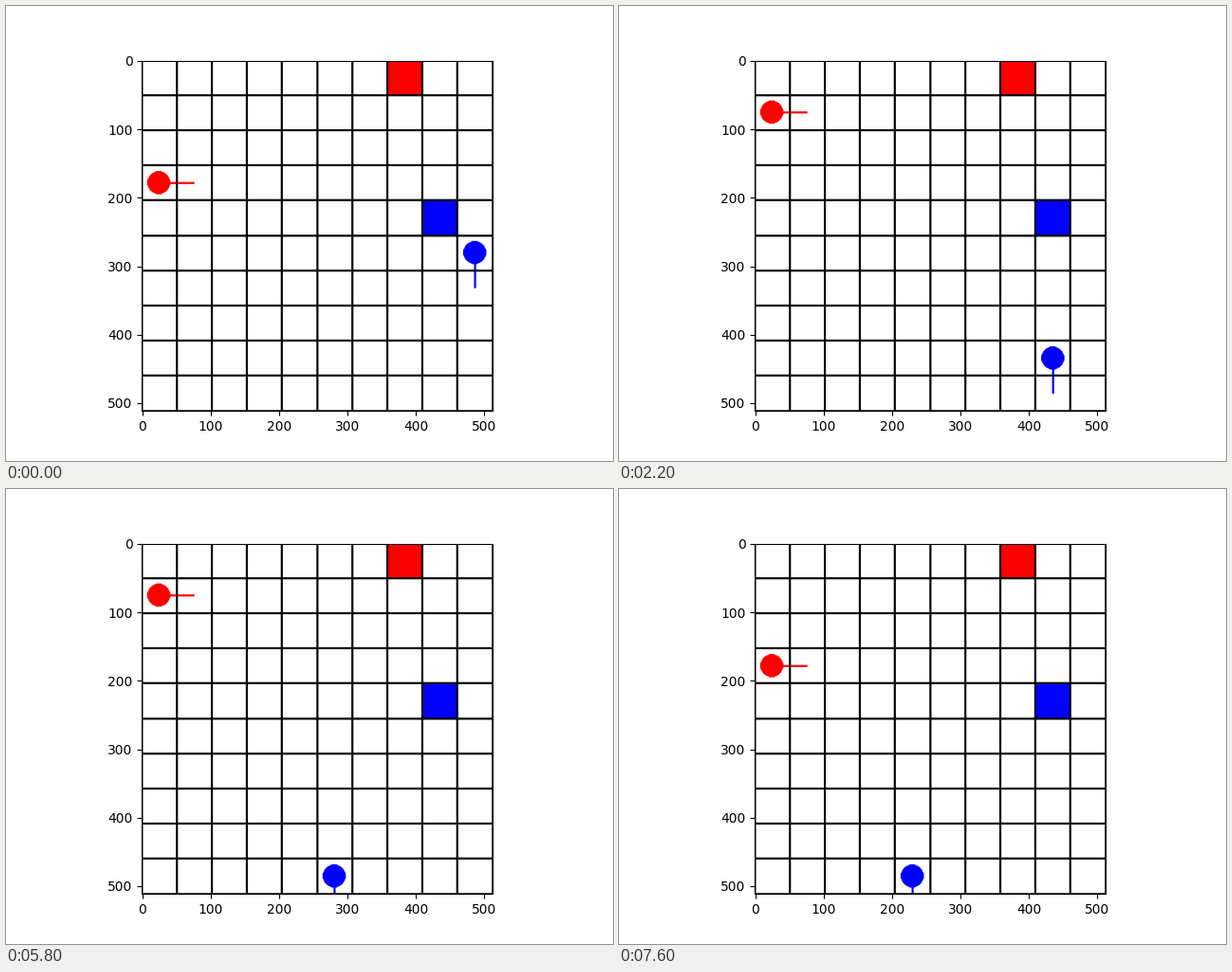
Write a matplotlib script that moves like this. It is 640 by 480 pixels and loops after 8000 ms.

```python
import numpy as np
import matplotlib.pyplot as plt
from matplotlib.animation import FuncAnimation

SIZE, CELLS = 512, 10
STEP_MS, LOOP_MS = 200, 8000
RADIUS = SIZE // (3 * CELLS)
RED, BLUE, BLACK = (255, 0, 0), (0, 0, 255), (0, 0, 0)
MOVES = {"L": (-1, 0), "R": (1, 0), "U": (0, -1), "D": (0, 1), ".": (0, 0)}

rows, cols = np.mgrid[:SIZE, :SIZE]


def px(cell):
    """Canvas coordinate of a position given in cells."""
    return int(SIZE * cell / CELLS)


def fill(img, x0, y0, x1, y1, color):
    img[max(y0, 0):y1 + 1, max(x0, 0):x1 + 1] = color


class Agent:
    """Walks one cell per beat, starting at first_ms."""

    def __init__(self, color, start, heading, first_ms, beat_ms, path):
        self.color, self.start, self.heading = color, start, heading
        self.first_ms, self.beat_ms, self.path = first_ms, beat_ms, path

    def cell(self, ms):
        beats = max(0, (ms - self.first_ms) // self.beat_ms + 1)
        return np.sum([self.start] + [MOVES[m] for m in self.path[:beats]], axis=0)

    def draw(self, img, ms):
        x, y = self.cell(ms)
        dx, dy = MOVES[self.heading]
        cx, cy = px(x + 0.5), px(y + 0.5)
        # Midpoint-circle rule, centred on a pixel corner
        a, b = abs(cols + 0.5 - cx) + 0.5, abs(rows + 0.5 - cy) + 0.5
        near, far = np.minimum(a, b), np.maximum(a, b)
        img[near ** 2 + (far - 0.5) ** 2 < RADIUS ** 2] = self.color
        # Pointer of one cell's length, three pixels thick
        ex, ey = px(x + 0.5 + dx), px(y + 0.5 + dy)
        fill(img, cx - dy, cy - dx, ex + dy, ey + dx, self.color)


AGENTS = [Agent(RED, (0, 3), "R", 600, 800, ".UU..UDDD"),
          Agent(BLUE, (9, 5), "D", 400, 600, "LDDDLD.L.LRLL")]


def draw_goal(img, x, y, color):
    fill(img, px(x), px(y), px(x) + px(1) - 1, px(y) + px(1) - 1, color)


def draw_grid(img):
    for k in range(CELLS + 1):
        p = px(k)
        fill(img, 0, p - 1, SIZE, p + 1, BLACK)
        fill(img, p - 1, 0, p + 1, SIZE, BLACK)


def render(ms):
    img = np.full((SIZE, SIZE, 3), 255, dtype=np.uint8)
    draw_goal(img, 7, 0, RED)
    draw_goal(img, 8, 4, BLUE)
    for agent in AGENTS:
        agent.draw(img, ms)
    draw_grid(img)
    return img


fig, ax = plt.subplots(figsize=(6.4, 4.8), dpi=100)
board = ax.imshow(render(0))


def update(i):
    board.set_data(render(i * STEP_MS))
    return [board]


anim = FuncAnimation(fig, update, frames=LOOP_MS // STEP_MS,
                     interval=STEP_MS, repeat=True, repeat_delay=0)
plt.show()
```
